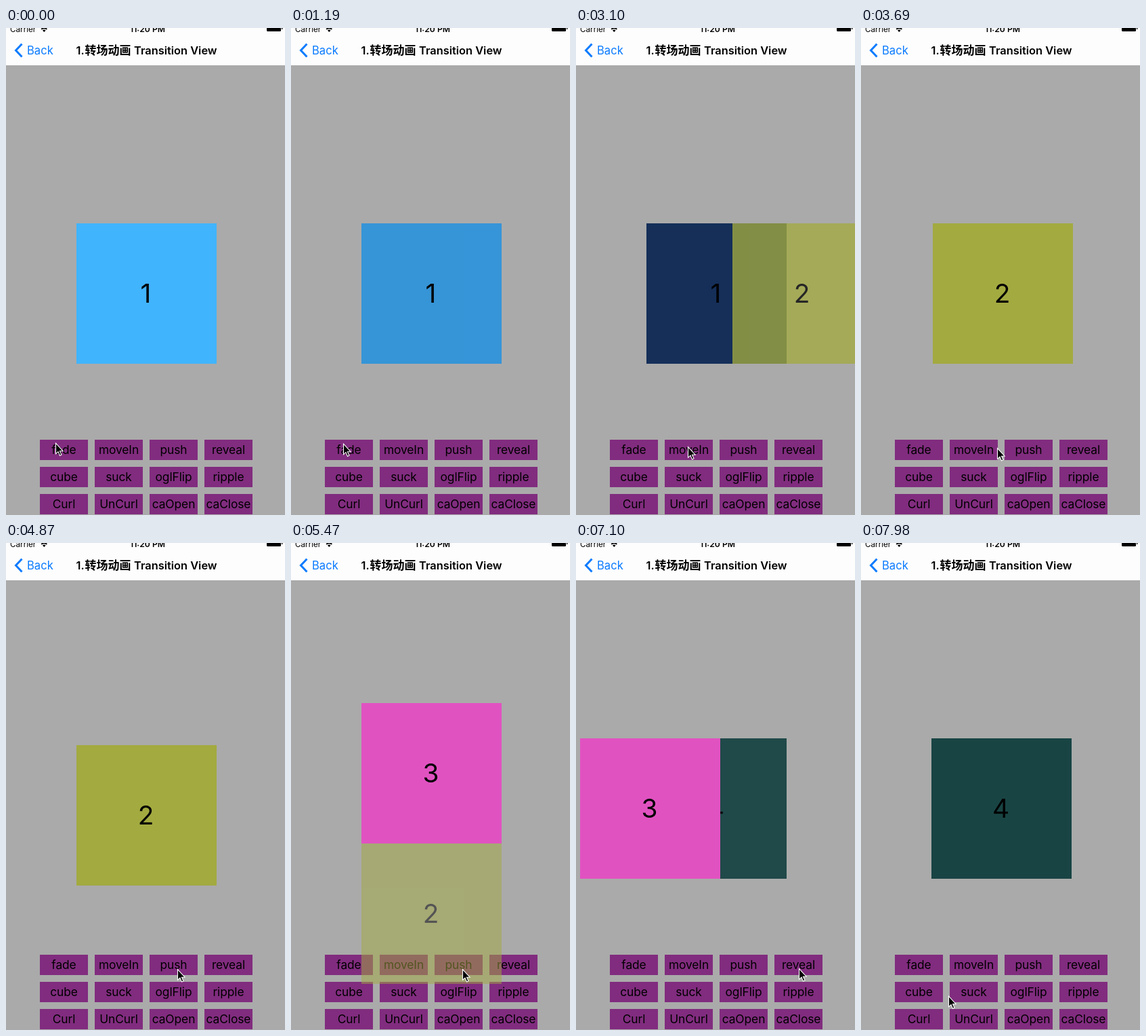
Recreate the animation shown at these times as an HTML page. Size 412 px wide and 718 px high, loop 8 s.

```html
<!DOCTYPE html>
<html lang="en">
<head>
<meta charset="utf-8">
<title>Transition View</title>
<style>
html, body { margin: 0; width: 100%; height: 100%; overflow: hidden; background: #aaa; }
svg { display: block; width: 412px; height: 718px; font-family: Inter, Roboto, "Noto Sans CJK SC", "Noto Sans CJK", sans-serif; }
.mid { text-anchor: middle; }
.key { font-size: 17.4px; letter-spacing: -.1px; }
.num { font-size: 38.8px; }
.bold { font-weight: 600; }
.title { font-weight: 600; font-size: 16.4px; }
.cjk { font-family: "Noto Sans CJK SC", "Noto Sans CJK", sans-serif; font-weight: 700; font-size: 17px; }
</style>
</head>
<body>
<svg viewBox="0 0 412 718">
  <rect width="412" height="718" fill="#aaa"/>
  <g id="keys"></g>
  <g id="views"></g>
  <rect width="412" height="55" fill="#fdfdfd"/>
  <g id="status">
    <text x="6" y="5.5" font-size="11.7">Carrier</text>
    <path d="M51.6 1.2a6.8 6.8 0 0 1 9.4 0l-1.3 1.4a4.9 4.9 0 0 0-6.8 0zM54 3.5a3.4 3.4 0 0 1 4.6 0L56.3 6z"/>
    <text class="mid bold" x="209" y="6" font-size="12.2">11:20 PM</text>
    <rect x="385" y="-5" width="21" height="10" rx="1.5"/>
    <rect x="407" y="-2" width="1.3" height="4" rx=".6"/>
  </g>
  <g fill="#0b7bff">
    <path d="M23.5 23.5 14.5 33l9 9.5" fill="none" stroke="#0b7bff" stroke-width="3"/>
    <text x="31" y="39" font-size="16.6">Back</text>
  </g>
  <text class="title" x="103.5" y="39">1.</text>
  <text class="cjk" x="116.5" y="39.3">转场动画</text>
  <text class="title" x="189" y="39">Transition View</text>
  <path id="cursor" d="M.5 .7V16.3L4 13.1 6.5 18.9 9 17.8 6.5 12.2H11.1Z" stroke="#fff" stroke-width="1.1"/>
</svg>
<script>
const LOOP = 8000, REFRESH = 147.8, SPAN = 1187;
const SIZE = 207, LEFT = 104, TOP = 288;
const $ = id => document.getElementById(id);

function add(parent, tag, attrs, text) {
  const el = document.createElementNS('http://www.w3.org/2000/svg', tag);
  for (const k in attrs) el.setAttribute(k, attrs[k]);
  if (text) el.textContent = text;
  return parent.appendChild(el);
}

const labels = 'fade moveIn push reveal cube suck oglFlip ripple Curl UnCurl caOpen caClose'.split(' ');
labels.forEach((label, i) => {
  const x = 50 + i % 4 * 81, y = 607 + Math.floor(i / 4) * 40;
  add($('keys'), 'rect', { x, y, width: 71, height: 30, fill: '#812c7f' });
  add($('keys'), 'text', { x: x + 35.5, y: y + 21.2, class: 'mid key' }, label);
});

const cards = [['1', '#41b4fe'], ['1', '#152f59'], ['2', '#a3aa40'], ['3', '#e152c1'], ['4', '#194444']]
  .map(([digit, fill]) => {
    const g = add($('views'), 'g', {});
    add(g, 'rect', { width: SIZE, height: SIZE, fill });
    add(g, 'text', { x: SIZE / 2 - 1, y: 117, class: 'mid num' }, digit);
    return g;
  });

// Ease-in-out, solved for the curve parameter by bisection
const bezier = (s, a, b) => 3 * (1 - s) * (1 - s) * s * a + 3 * (1 - s) * s * s * b + s * s * s;
const clamp = x => Math.max(0, Math.min(1, x));

function ease(x) {
  let lo = 0, hi = 1;
  for (let i = 0; i < 30; i++) {
    const mid = (lo + hi) / 2;
    if (bezier(mid, .42, .58) < x) lo = mid; else hi = mid;
  }
  return bezier(lo, 0, 1);
}

// Opacity runs at twice the pace of the movement; faint values vanish
const fade = p => p < .05 ? 0 : Math.min(1, 2 * p);

// Each move returns [dx, dy, opacity] for the old and the new card
const moves = [
  { at: 790, run: p => [[0, 0, 1], [0, 0, p]] },
  { at: 2590, run: p => [[0, 0, fade(1 - p)], [SIZE * (1 - p), 0, fade(p)]] },
  { at: 4694, run: p => [[0, SIZE * p, fade(1 - p)], [0, SIZE * (p - 1), fade(p)]] },
  { at: 6519, under: true, run: p => [[-SIZE * p, 0, fade(1 - p)], [0, 0, fade(p)]] }
];

function place(card, [dx, dy, alpha]) {
  card.setAttribute('transform', `translate(${LEFT + Math.round(dx)} ${TOP + Math.round(dy)})`);
  card.setAttribute('opacity', alpha);
}

// Pointer glides: first and last refresh, then where it comes to rest
const glides = [
  [0, 1, 77, 612.5], [9, 12, 88, 613.5], [12, 17, 165, 617],
  [22, 25, 201, 619], [25, 26, 235, 622], [26, 27, 278, 637],
  [29, 31, 253, 628], [40, 44, 329, 627], [51, 54, 129, 667.5]
];

function pointer(tick) {
  let x = 73, y = 611.5;
  for (const [from, to, endX, endY] of glides) {
    const left = 1 - clamp((tick - from) / (to - from));
    const f = 1 - left * left;
    x += (endX - x) * f;
    y += (endY - y) * f;
  }
  return `translate(${x} ${y})`;
}

function draw(time) {
  const tick = Math.floor((time + 10) / REFRESH), t = tick * REFRESH;
  const now = Math.max(0, moves.filter(m => m.at <= t).length - 1);
  const { at, under, run } = moves[now];
  const [from, to] = run(ease(clamp((t - at) / SPAN)));
  cards.forEach(card => card.setAttribute('opacity', 0));
  place(cards[now], from);
  place(cards[now + 1], to);
  const pair = [cards[now], cards[now + 1]];
  $('views').append(...(under ? pair.reverse() : pair));
  $('cursor').setAttribute('transform', pointer(tick));
}

const start = performance.now();
function loop() {
  draw((performance.now() - start) % LOOP);
  requestAnimationFrame(loop);
}
loop();
</script>
</body>
</html>
```
